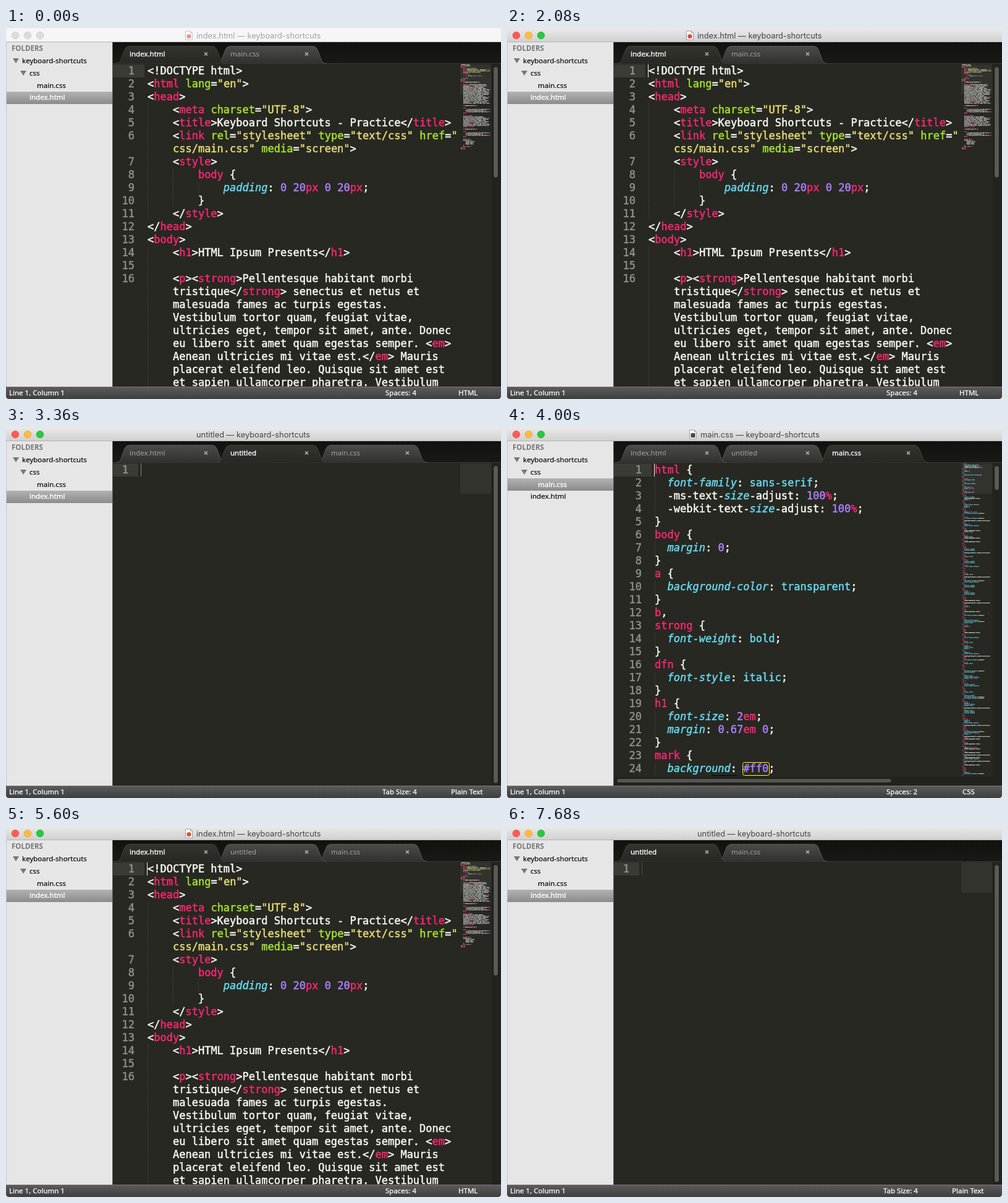
An HTML page that plays this animation: 801x600 px, repeating every 8 s.

```html
<!DOCTYPE html>
<html lang="en">
<head>
<meta charset="utf-8">
<title>Editor tabs</title>
<style>
  html, body { margin: 0; width: 100%; height: 100%; overflow: hidden; background: #272822; }
  svg { display: block; }
  text { white-space: pre; font: 11.5px "Noto Sans", sans-serif; }
  .code text, .code tspan { fill: currentColor; stroke: currentColor; stroke-width: .5px; }
  .code text { font: 17px "DejaVu Sans Mono", monospace; color: #f8f8f2; }
  .code .num { color: #8f908a; text-anchor: end; }
  .code .r { color: #f92672; }
  .code .g { color: #a6e22e; }
  .code .y { color: #e6db74; }
  .code .p { color: #ae81ff; }
  .code .c, .code .k { color: #66d9ef; }
  .code .k { font-style: italic; }
  .code .mini text, .code .mini tspan { stroke-width: 3px; }
  .mini { opacity: .85; }
  .guide { stroke: #45463f; stroke-dasharray: 1 1; }
  .status text { fill: #fff; stroke: #fff; stroke-width: .25px; }
  #title { font: 12.8px Inter, sans-serif; fill: #444; }
  .idle #title { fill: #a3a3a3; }
  .idle #bar { fill: #f6f6f6; }
  .idle #icon { opacity: .55; }
  .idle .light { fill: #dcdcdc; stroke: #c6c6c6; }
  .item { fill: #000; stroke: #000; stroke-width: .15px; }
  .item.picked { fill: #fff; stroke: #fff; stroke-width: .35px; }
  .tab path { fill: url(#tabOff); stroke: #5a5b56; }
  .tab text { fill: #a3a39f; }
  .tab.on path { fill: url(#tabOn); stroke: #42433d; }
  .tab.on .name { fill: #fff; stroke: #fff; stroke-width: .3px; }
</style>
</head>
<body>
<svg id="stage" width="801" height="600" viewBox="0 0 801 600"></svg>
<script>
const PITCH = 163, STEP = 160, LOOP = 8000;

const htmlRows = `<!DOCTYPE html>
<[r html] [g lang]=[y "en"]>
<[r head]>
    <[r meta] [g charset]=[y "UTF-8"]>
    <[r title]>Keyboard Shortcuts - Practice</[r title]>
    <[r link] [g rel]=[y "stylesheet"] [g type]=[y "text/css"] [g href]=[y "]
|    [y css/main.css"] [g media]=[y "screen"]>
    <[r style]>
        [r body] {
            [k padding]: [p 0] [p 20][r px] [p 0] [p 20][r px];
        }
    </[r style]>
</[r head]>
<[r body]>
    <[r h1]>HTML Ipsum Presents</[r h1]>
    
    <[r p]><[r strong]>Pellentesque habitant morbi
|    tristique</[r strong]> senectus et netus et
|    malesuada fames ac turpis egestas.
|    Vestibulum tortor quam, feugiat vitae,
|    ultricies eget, tempor sit amet, ante. Donec
|    eu libero sit amet quam egestas semper. <[r em]>
|    Aenean ultricies mi vitae est.</[r em]> Mauris
|    placerat eleifend leo. Quisque sit amet est
|    et sapien ullamcorper pharetra. Vestibulum`.split('\n');

const cssRows = `[r html] {
  [k font-family]: [c sans-serif];
  -ms-text-[k size]-adjust: [p 100][r %];
  -webkit-text-[k size]-adjust: [p 100][r %];
}
[r body] {
  [k margin]: [p 0];
}
[r a] {
  [k background-color]: [c transparent];
}
[r b],
[r strong] {
  [k font-weight]: [c bold];
}
[r dfn] {
  [k font-style]: [c italic];
}
[r h1] {
  [k font-size]: [p 2][r em];
  [k margin]: [p 0.67][r em] [p 0];
}
[r mark] {
  [k background]: [p #ff0];`.split('\n');

// Rows that only show in the minimaps
const dense = n => Array.from({ length: n }, (_, i) => htmlRows[17 + (i * 3 + 1) % 8].slice(1));
const item = '        <[r li]>Lorem ipsum dolor sit amet elit.</[r li]>';
const htmlTail = [
  ...dense(7), '', '    <[r h2]>Header Level 2</[r h2]>', '',
  '    <[r ol]>', item, '        consectetuer adipiscing elit.</[r li]>', item, '    </[r ol]>', '',
  '    <[r blockquote]><[r p]>', ...dense(8), '    </[r p]></[r blockquote]>', '',
  '    <[r h3]>Header Level 3</[r h3]>', '',
  '    <[r ul]>', item, '        consectetuer adipiscing.</[r li]>', item, '    </[r ul]>', '',
  '    <[r pre]><[r code]>', '    #header h1 a {', '        display: block;',
  '        width: 300px;', '        height: 80px;', '    }', '    </[r code]></[r pre]>',
  '</[r body]>', '</[r html]>'
];

function cssTail(count) {
  let seed = 7;
  const rnd = n => (seed = seed * 16807 % 2147483647) % n;
  const pick = list => list[rnd(list.length)];
  const rows = ['}'];
  while (rows.length < count) {
    for (let i = rnd(4); i > 0; i--) rows.push(`[r ${pick(['a', 'svg', 'img', 'input', 'code'])}],`);
    rows.push(`[r ${pick(['button', 'pre', 'hr', 'legend', 'td'])}] {`);
    for (let i = 1 + rnd(3); i > 0; i--) rows.push('  ' + pick([
      '[k margin]: [p 0];', '[k display]: [c block];', '[k vertical-align]: [c baseline];',
      '[k font-family]: [c monospace], monospace;', '[k overflow]: [c visible];',
      '[k padding]: [p 0.35][r em] [p 0.6][r em];', '-webkit-appearance: button;']));
    rows.push('}');
    if (!rnd(6)) rows.push('  input[type="search"]::-webkit-search-button,');
  }
  return rows.slice(0, count);
}

const esc = s => s.replace(/&/g, '&amp;').replace(/</g, '&lt;').replace(/>/g, '&gt;');
const paint = s => esc(s).replace(/\[([rgypck]) ([^\]]*)\]/g, '<tspan class="$1">$2</tspan>');
const text = (x, y, s, attrs = '') => `<text x="${x}" y="${y}" ${attrs}>${s}</text>`;
const rect = (x, y, w, h, fill, attrs = '') =>
  `<rect x="${x}" y="${y}" width="${w}" height="${h}" fill="${fill}" ${attrs}/>`;
const grad = (id, a, b) => `<linearGradient id="${id}" x2="0" y2="1">
  <stop stop-color="${a}"/><stop offset="1" stop-color="${b}"/></linearGradient>`;

const docs = {
  html: { name: 'index.html', titleX: 308, x: 229, rows: htmlRows, tail: htmlTail, unit: 4, mapX: 736,
    thumb: 180, indent: [614, 'Spaces: 4'], syntax: [732, 'HTML'] },
  untitled: { name: 'untitled', titleX: 308, x: 219, rows: [''], tail: [], unit: 4, mapX: 736,
    thumb: 514, indent: [609, 'Tab Size: 4'], syntax: [720, 'Plain Text'] },
  css: { name: 'main.css', titleX: 313, x: 239, rows: cssRows, tail: cssTail(228), unit: 2, mapX: 737.5,
    thumb: 40, indent: [614, 'Spaces: 2'], syntax: [737, 'CSS'] }
};

function pane(id) {
  const { x, rows, tail, unit, mapX, thumb } = docs[id];
  let lines = '', line = 0;
  rows.forEach((row, i) => {
    const wrapped = row[0] === '|', body = wrapped ? row.slice(1) : row;
    const top = 59 + 21 * i, indent = body.match(/^ */)[0].length;
    if (!wrapped) lines += text(x - 21, top + 16, ++line, 'class="num"');
    for (let c = 0; c < indent; c += unit) {
      const gx = Math.round(x + c * 10.234) + .5;
      lines += `<path class="guide" d="M${gx} ${top}v21"/>`;
    }
    lines += text(x, top + 16, paint(body));
  });
  const mini = [...rows, ...tail]
    .map((row, i) => text(0, 16 + 21 * i, paint(row.replace('|', '')))).join('');
  const extra = id !== 'css' ? '' :
    rect(331, 563, 41, 1.5, '#0c0c0a') +
    rect(381.5, 542.5, 43, 21, 'none', 'rx="3" stroke="#ff0"') +
    rect(173, 566, 613, 14, '#22231e') +
    rect(177.5, 568.5, 445, 7, '#555651', 'rx="3.5" stroke="#161712"');
  return `<g class="code" id="${id}">
    ${rect(173, 59, x - 178, 21, '#3a3b35')}
    <g clip-path="url(#editor)">${lines}</g>
    ${rect(735, 59, 50, 49, '#32332d')}
    <g clip-path="url(#map)"><g class="mini" transform="translate(${mapX} 58.5) scale(.0955)">${mini}</g></g>
    ${rect(788.5, 62.5, 8, thumb, '#5a5b57', 'rx="4" stroke="#161712"')}
    ${extra}
    ${rect(x - 1, 59, 1, 21, '#f8f8f0', 'class="caret"')}
  </g>`;
}

function tab(id, left, w, on) {
  if (w < 40) return '';
  const r = left + w + 14;
  const d = `M${left} 57.5C${left + 8} 57 ${left + 8} 50 ${left + 11} 43S${left + 14} 29.5 ${left + 23} 29.5
    H${r - 23}C${r - 14} 29.5 ${r - 14} 36 ${r - 11} 43S${r - 8} 57 ${r} 57.5`;
  return `<g class="tab ${on ? 'on' : ''}"><path d="${d}"/>
    ${w > 95 ? text(left + 22, 46, docs[id].name, 'class="name"') : ''}
    ${w > 135 ? `<path d="M${r - 34} 39.5l5 5m0-5l-5 5" style="stroke:#b5b5b1;stroke-width:1.5"/>` : ''}</g>`;
}

const lights = [['#fc5b57', '#e0443e'], ['#fdbc40', '#dfa023'], ['#28c840', '#1aab29']]
  .map(([f, s], i) => `<circle class="light" cx="${15 + 20 * i}" cy="12" r="5.8" fill="${f}" stroke="${s}" stroke-width=".7"/>`);

const stage = document.getElementById('stage');
stage.innerHTML = `<defs>
    ${grad('active', '#eaeaea', '#d1d1d1')}${grad('row', '#b2b2b2', '#8b8b8b')}
    ${grad('foot', '#5c5c5c', '#3e3e3e')}${grad('strip', '#11120e', '#191a15')}
    ${grad('tabOff', '#4b4c47', '#31322d')}${grad('tabOn', '#33342e', '#272822')}
    <clipPath id="editor">${rect(173, 58, 561, 522, '#000')}</clipPath>
    <clipPath id="map">${rect(735, 58, 50, 506, '#000')}</clipPath>
  </defs>
  ${rect(173, 58, 628, 522, '#272822')}
  ${rect(786, 58, 15, 522, '#22231e')}
  ${rect(173, 23, 628, 35, 'url(#strip)')}
  ${rect(173, 57, 628, 1, '#3b3c36')}
  <g id="tabs"></g>
  ${Object.keys(docs).map(pane).join('')}
  ${rect(0, 23, 172, 557, '#e6e6e6')}
  ${rect(0, 23, 1, 557, '#c4c4c4')}
  ${rect(172, 23, 1, 557, '#55564f')}
  <rect id="select" x="1" width="171" height="20" fill="url(#row)"/>
  ${text(9, 37, 'FOLDERS', 'style="font-weight:700" fill="#777"')}
  <path d="M11 49h10l-5 8zM23 69h10l-5 8z" fill="#777"/>
  ${text(26, 57, 'keyboard-shortcuts', 'class="item"')}${text(38, 77, 'css', 'class="item"')}
  ${text(50, 97, 'main.css', 'class="item" id="cssItem"')}
  ${text(38, 116, 'index.html', 'class="item" id="htmlItem"')}
  ${rect(0, 0, 801, 22, 'url(#active)', 'id="bar"')}
  ${rect(0, 22, 801, 1, '#b3b3b3')}
  ${lights.join('')}
  <g id="icon"><path d="M.5 .5h8l3 3v11h-11z" fill="#fff" stroke="#9b9b9b"/><path d="M8.5 .5v3h3" fill="none" stroke="#9b9b9b"/>
    <circle id="htmlMark" cx="6" cy="9" r="3.6" fill="#dd4b3e"/>
    <rect id="cssMark" x="2.5" y="5.5" width="7" height="7" fill="#484848"/></g>
  <text id="title" y="17"></text>
  <g class="status">${rect(0, 580, 801, 20, 'url(#foot)')}${rect(0, 580, 801, 1, '#777')}
    ${text(5, 594, 'Line 1, Column 1')}
    <text id="indent" y="594"></text><text id="syntax" y="594"></text></g>
  <path d="M0 595q0 5 5 5h-5zM801 595q0 5-5 5h5z" fill="#fff"/>`;

const $ = id => document.getElementById(id);
const show = (el, on) => { el.style.display = on ? '' : 'none'; };
function place(el, [x, s]) {
  el.setAttribute('x', x);
  el.textContent = s;
}

// Start time, open document, selected sidebar file
const scenes = [
  [0, 'html', 'html'], [960, 'html', 'html'], [2400, 'untitled', 'html'], [4000, 'css', 'css'],
  [5280, 'untitled', 'css'], [5600, 'html', 'html'], [7360, 'untitled', 'html']
];

// The caret blinks anew after every switch
function caretAlpha(age) {
  const a = age % 1120;
  return a < 320 ? 1 : a < 480 ? .18 : a < 960 ? 0 : .45;
}

// What is left of a tab slide after a given time
function remaining(age) {
  const left = Math.exp(-.012 * age - .094);
  return age < 0 ? 1 : left < .03 ? 0 : left;
}

function drawTabs(t, open) {
  const widths = {
    html: PITCH * remaining(t - 7360),
    untitled: PITCH * (1 - remaining(t - 2400)),
    css: PITCH
  };
  let left = 178;
  const parts = Object.keys(docs).map(id => {
    const part = { id, left, w: widths[id], on: id === open };
    left += part.w;
    return part;
  });
  parts.reverse().sort((a, b) => a.on - b.on);
  $('tabs').innerHTML = parts.map(p => tab(p.id, p.left, p.w, p.on)).join('');
}

function draw(t) {
  const [start, open, selected] = scenes.filter(s => s[0] <= t).pop();
  const doc = docs[open], idle = t < 960;
  stage.setAttribute('class', idle ? 'idle' : '');
  drawTabs(t, open);
  for (const id in docs) show($(id), id === open);
  document.querySelector(`#${open} .caret`).style.opacity = idle ? 0 : caretAlpha(t - start);
  $('select').setAttribute('y', selected === 'css' ? 83 : 103);
  for (const id of ['css', 'html']) {
    $(id + 'Item').classList.toggle('picked', id === selected);
    show($(id + 'Mark'), id === open);
  }
  show($('icon'), open !== 'untitled');
  $('icon').setAttribute('transform', `translate(${doc.titleX - 18} 4.5)`);
  place($('title'), [doc.titleX, `${doc.name} — keyboard-shortcuts`]);
  place($('indent'), doc.indent);
  place($('syntax'), doc.syntax);
}

const begin = performance.now();
let shown = -1;
function tick() {
  const t = Math.floor((performance.now() - begin) % LOOP / STEP) * STEP;
  if (t !== shown) draw(shown = t);
  requestAnimationFrame(tick);
}
tick();
</script>
</body>
</html>
```
